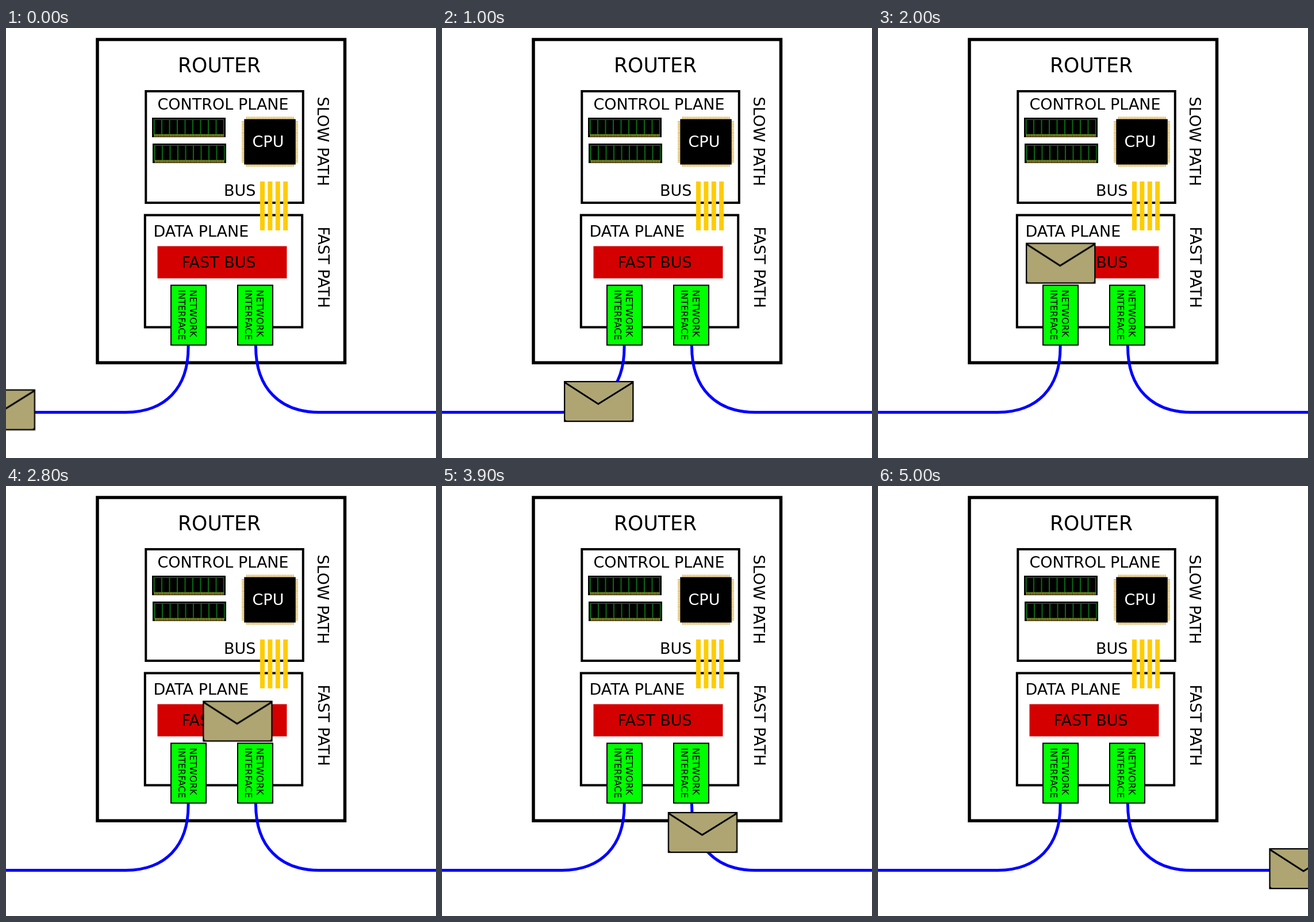
An HTML page for the animation above (5100 ms loop, 748x748 px).

```html
<!DOCTYPE html>
<html lang="en">
<head>
<meta charset="utf-8">
<title>Router fast path</title>
<style>
  html, body { margin: 0; width: 100%; height: 100%; overflow: hidden; background: #fff; }
  svg { display: block; width: 100vw; height: 100vh; }
  text { font: 27px "DejaVu Sans", sans-serif; }
  .title { font-size: 34.7px; }
  .port text { font-size: 16px; }
  .box { fill: none; stroke: #000; stroke-width: 4; }
  .cable { fill: none; stroke: #00f; stroke-width: 5; }
  .pins { fill: none; stroke: #d9ac3c; stroke-width: 4.5; stroke-dasharray: 1.5 1.2; }

  #packet { animation: route 5100ms infinite; }

  /* One step every 100 ms */
  @keyframes route {
    0%      { transform: translate(-70.5px, 628.5px); animation-timing-function: steps(6); }
    11.764% { transform: translate(112px, 628.5px);   animation-timing-function: steps(2); }
    15.686% { transform: translate(173px, 628.5px);   animation-timing-function: steps(2); }
    19.607% { transform: translate(212px, 614px);     animation-timing-function: steps(2); }
    23.529% { transform: translate(246.7px, 591.3px); animation-timing-function: steps(1); }
    25.490% { transform: translate(257px, 559.7px);   animation-timing-function: steps(6); }
    37.254% { transform: translate(257px, 373.5px);   animation-timing-function: steps(2); }
    41.176% { transform: translate(257px, 373.5px);   animation-timing-function: steps(9); }
    58.823% { transform: translate(366.5px, 373.5px); animation-timing-function: steps(8); }
    74.509% { transform: translate(378.5px, 543px);   animation-timing-function: steps(2); }
    78.431% { transform: translate(407px, 591px);     animation-timing-function: steps(2); }
    82.352% { transform: translate(467.5px, 620.7px); animation-timing-function: steps(2); }
    86.274% { transform: translate(518px, 624.5px);   animation-timing-function: steps(6); }
    98.039%, 100% { transform: translate(680.3px, 630px); animation-timing-function: steps(1); }
  }
</style>
</head>
<body>
<svg viewBox="0 0 748 748">
  <defs>
    <pattern id="chips" x="4.5" y="4" width="13.5" height="25" patternUnits="userSpaceOnUse">
      <rect width="11.5" height="24.5"/>
    </pattern>
    <g id="ram">
      <rect width="128" height="34"/>
      <rect x="2.5" y="2.5" width="123" height="27.5" fill="#0b6b14"/>
      <rect x="4.5" y="4" width="119.5" height="25" fill="url(#chips)"/>
      <path class="pins" d="M4 31.2H125"/>
    </g>
    <g id="port" class="port">
      <rect x="1" y="1" width="61" height="104" fill="#0f0" stroke="#000" stroke-width="2"/>
      <text transform="translate(34 9) rotate(90)">NETWORK</text>
      <text transform="translate(14.3 9) rotate(90)">INTERFACE</text>
    </g>
  </defs>

  <rect class="box" x="159" y="20" width="430.5" height="562.3" style="stroke-width:5.5"/>
  <text class="title" x="299" y="77">ROUTER</text>

  <rect class="box" x="243.3" y="110" width="273.5" height="194"/>
  <text x="263.5" y="142">CONTROL PLANE</text>
  <use href="#ram" x="254" y="156"/>
  <use href="#ram" x="255" y="201"/>
  <path class="pins" d="M418 156.5H501M418 239.2H501M412.3 162V235M505.8 162V235"/>
  <rect x="414.3" y="158.5" width="89.5" height="79"/>
  <text x="428.5" y="207" fill="#fff">CPU</text>
  <text x="379" y="291.5">BUS</text>
  <text transform="translate(541.5 119.5) rotate(90)">SLOW PATH</text>

  <rect class="box" x="241.8" y="325.5" width="273.4" height="195"/>
  <text x="256.5" y="363">DATA PLANE</text>
  <rect x="263.5" y="379.5" width="225" height="56" fill="#d40000"/>
  <text x="305.5" y="416.5">FAST BUS</text>
  <text transform="translate(542.5 345.5) rotate(90)">FAST PATH</text>
  <path d="M446 267V352M459.4 267V352M472.8 267V352M486.2 267V352" stroke="#fc0" stroke-width="8"/>

  <path class="cable" d="M0 668.5H208C275 668.5 319 628 317 550"/>
  <path class="cable" d="M434.5 550C433 628 478 668.5 545 668.5H748"/>
  <use href="#port" x="286" y="446.5"/>
  <use href="#port" x="402" y="446.5"/>

  <g id="packet">
    <rect width="121.5" height="71.3"/>
    <rect x="2.3" y="2.3" width="116.9" height="66.7" rx="3.5" fill="#aea573"/>
    <path d="M1.5 2.5L59.8 40L120 2.5" fill="none" stroke="#000" stroke-width="2.8"/>
  </g>
</svg>
</body>
</html>
```
